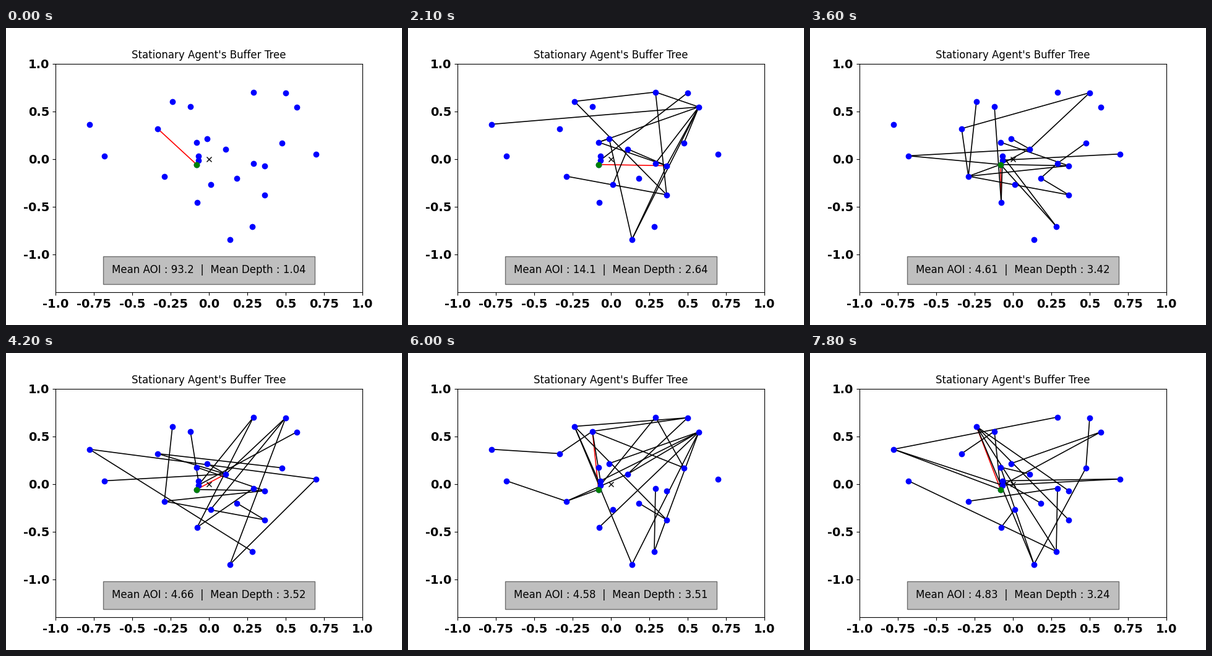
Recreate the animation shown at these times as a matplotlib script. Size 640 px wide and 480 px high, loop 8000 ms.

```python
import matplotlib.pyplot as plt
from matplotlib.animation import FuncAnimation
from matplotlib.collections import LineCollection

FRAMES, INTERVAL, HOLD = 80, 100, 3  # the tree changes every HOLD frames

# Node positions in stage pixels; Z is the stationary agent.
PIXELS = dict(
    A=(135, 156), B=(159, 207), C=(245, 163), D=(269, 119), E=(298, 127),
    F=(308, 185), G=(325, 179), H=(311, 207), I=(311, 214), J=(256, 240),
    K=(331, 253), L=(309, 282), M=(355, 196), N=(400, 104), O=(452, 105),
    P=(470, 128), Q=(446, 186), R=(501, 204), S=(400, 219), T=(418, 223),
    U=(373, 243), V=(418, 270), W=(398, 321), X=(362, 342), Z=(308, 221))
NODES = {k: ((x - 328) / 248, (212 - y) / 154) for k, (x, y) in PIXELS.items()}

# (step, mean age, mean depth, child-parent links; the first link is active)
KEYS = [
    (0, 93.2, 1.04, "CZ"),
    (4, 43.3, 1.96, "XZ CZ WZ JZ IZ QJ VJ DV PX TX FP SP OI"),
    (10, 4.56, 3.32, "TZ PT FT MT GF XG KM NP AP QP DN VN SQ US LZ EL JZ CJ "
                     "OC BZ WZ HW IL RI"),
    (14, 4.66, 3.52, "MZ TZ IZ HZ JT FT DJ VJ UV GM BM OM CM QC KO XO RX AR "
                     "WA NI PI EH LN SL"),
    (17, 4.61, 3.20, "PZ TZ JT VJ UV KZ RK AR CR CQ BR CZ FZ IZ DI NI EH GP "
                     "HP MP OM LP XP WP SW"),
    (22, 4.56, 3.72, "EZ CE AC QE NQ OE DO VD UV XD ID JZ MJ BJ HB WZ PW RP "
                     "LR GP SP KS FS TC"),
    (26, 4.83, 3.24, "DZ TD VD WD XD BW SW JS QX OQ FX MF LK AZ NA IA RI HR "
                     "UH PI GP EZ CE"),
]


def tree_at(step):
    """Return links, active link first, and both means."""
    for (s0, age0, depth0, old), (s1, age1, depth1, new) in zip(KEYS, KEYS[1:]):
        if step <= s1:
            break
    u = (step - s0) / (s1 - s0)
    old, new = old.split(), new.split()
    if u == 0:
        links = old
    elif u == 1:
        links = new
    else:
        links = new[:round(u * len(new))] + old[round(u * len(old)):]
        roots = [link for link in links if link[1] == "Z"]
        links.insert(0, roots[step % len(roots)])
    links = list(dict.fromkeys(links))
    return links, age0 * (age1 / age0) ** u, depth0 + (depth1 - depth0) * u


plt.rcParams["font.family"] = "DejaVu Sans"
fig, ax = plt.subplots(figsize=(6.4, 4.8), dpi=100)
ax.set(xlim=(-1, 1), ylim=(-1.4, 1))
ax.set_title("Stationary Agent's Buffer Tree", fontsize=12)
xticks = [i / 4 for i in range(-4, 5)]
yticks = [i / 2 for i in range(-2, 3)]
ax.set_xticks(xticks, [str(v) for v in xticks], fontsize=14, weight="bold")
ax.set_yticks(yticks, [str(v) for v in yticks], fontsize=14, weight="bold")

edges = ax.add_collection(LineCollection([], linewidths=1.18, zorder=1),
                          autolim=False)
ax.plot(0, 0, "kx")
ax.plot(*zip(*NODES.values()), "bo")
ax.plot(*NODES["Z"], "go")
label = ax.text(0, -1.2, "", ha="center", fontsize=12,
                bbox=dict(facecolor="grey", alpha=0.5, pad=10))


def update(frame):
    links, age, depth = tree_at(frame // HOLD)
    edges.set_segments([[NODES[a], NODES[b]] for a, b in links])
    edges.set_color(["red"] + ["black"] * (len(links) - 1))
    age_text = f"{age:.1f}" if age >= 10 else f"{age:.2f}"
    label.set_text(f"Mean AOI : {age_text}  |  Mean Depth : {depth:.2f}")
    return edges, label


anim = FuncAnimation(fig, update, frames=FRAMES, interval=INTERVAL,
                     repeat=True, repeat_delay=0)
plt.show()
```
